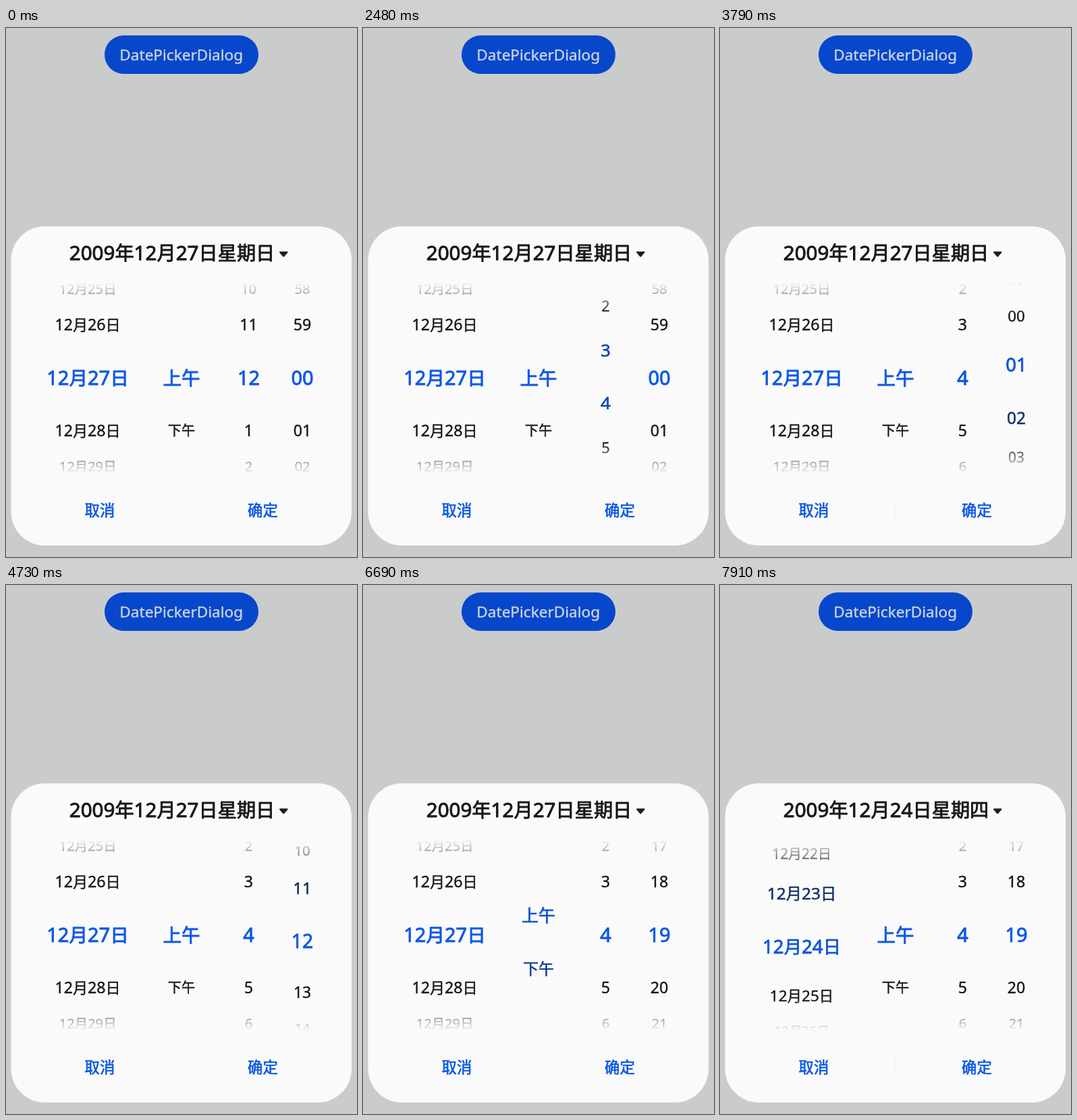
An HTML page with a canvas that plays this animation: 520x784 px, repeating every 7.99 s.

```html
<!DOCTYPE html>
<html lang="zh">
<head>
<meta charset="utf-8">
<style>
  html, body { margin: 0; width: 100%; height: 100%; overflow: hidden; background: #cacccb; }
  canvas { display: block; width: 520px; height: 784px; }
</style>
</head>
<body>
<canvas id="stage" width="520" height="784"></canvas>
<script>
const ctx = document.getElementById('stage').getContext('2d');
const LOOP = 7990;
const TICK = 78; // the wheels redraw in steps of this many ms
const MIDDLE = 518.3;
const BLUE = [14, 88, 228], INK = [21, 23, 27];
const PANEL = '250,250,250';

const lerp = (a, b, k) => a + (b - a) * k;
const drag = p => p * p * (3 - 2 * p);
const fling = p => 1 - (1 - p) ** 2;
const swipe = (start, ticks, to, ease) => ({ start, ticks, to, ease });

const dates = {
  x: 121, first: 27, pad: 152, side: 22.1,
  label: i => `12月${i}日`,
  swipes: [swipe(7440, 1, 26, fling), swipe(7518, 9, 23, drag)]
};
const halves = {
  x: 260, first: 0, pad: 74, side: 20.2,
  label: i => ['上午', '下午'][i] || '',
  swipes: [swipe(5370, 9, 1, fling), swipe(6450, 10, 0, fling)]
};
const hours = {
  x: 359.5, first: 0, pad: 74, side: 22.1,
  label: i => String((i + 12) % 12 || 12),
  swipes: [swipe(910, 9, 1, drag), swipe(1610, 20, 4, fling)]
};
const minutes = {
  x: 439, first: 0, pad: 74, side: 22.1,
  label: i => String((i + 60) % 60).padStart(2, '0'),
  swipes: [swipe(3170, 6, 1, drag), swipe(3790, 9, 8, drag), swipe(4640, 5, 19, drag)]
};
const wheels = [dates, halves, hours, minutes];

// Wheel position at time t, and whether a finger is about to lift
function wheelState({ first, swipes }, t) {
  let pos = first, pressed = false;
  for (const s of swipes) {
    if (t < s.start) break;
    const n = Math.floor((t - s.start) / TICK) + 1;
    pos = lerp(pos, s.to, s.ease(Math.min(1, n / s.ticks)));
    pressed = n > 1 && n === s.ticks;
  }
  return { pos, pressed };
}

// Centred text; digits and letters use a slightly larger Latin face
function write(str, x, y, size, color, bold) {
  const runs = str.match(/[\u4e00-\u9fff]+|[^\u4e00-\u9fff]+/g) || [];
  const setFont = run => {
    ctx.font = /[\u4e00-\u9fff]/.test(run)
      ? `${size}px "Noto Sans CJK SC", "Noto Sans CJK", sans-serif`
      : `${size * 1.05}px "Noto Sans", sans-serif`;
  };
  const widths = runs.map(run => {
    setFont(run);
    return ctx.measureText(run).width;
  });
  let left = x - widths.reduce((a, b) => a + b, 0) / 2;
  ctx.fillStyle = ctx.strokeStyle = color;
  ctx.lineWidth = bold;
  ctx.lineJoin = 'round';
  runs.forEach((run, i) => {
    setFont(run);
    ctx.fillText(run, left, y + size * 0.37);
    ctx.strokeText(run, left, y + size * 0.37);
    left += widths[i];
  });
}

function box(x, y, w, h, r, color) {
  ctx.fillStyle = color;
  ctx.beginPath();
  ctx.roundRect(x, y, w, h, r);
  ctx.fill();
}

function fade(y0, y1) {
  const g = ctx.createLinearGradient(0, y0, 0, y1);
  g.addColorStop(0, `rgba(${PANEL},1)`);
  g.addColorStop(1, `rgba(${PANEL},0)`);
  ctx.fillStyle = g;
  ctx.fillRect(30, Math.min(y0, y1), 460, Math.abs(y1 - y0));
}

function drawWheel(wheel, t) {
  const { x, pad, side, label } = wheel;
  const { pos, pressed } = wheelState(wheel, t);
  if (pressed) box(x - pad / 2, 481.5, pad, 76, 11, '#f5f5f5');
  for (let i = Math.ceil(pos - 2.9); i <= pos + 2.9; i++) {
    const d = i - pos;
    const near = Math.min(1, Math.abs(d));
    const far = Math.abs(d) - near;
    const y = MIDDLE + Math.sign(d) * (near * 78.5 + far * 53);
    const size = lerp(27.6, side, near) - far * 2.8;
    const color = BLUE.map((c, n) => Math.round(lerp(c, INK[n], near * near)));
    write(label(i), x, y, size, `rgb(${color})`, lerp(0.9, 0.4, near) - far * 0.15);
  }
}

function drawTitle(t) {
  const day = Math.round(wheelState(dates, t - TICK).pos);
  const weekday = '日一二三四五六'[(day + 1) % 7];
  write(`2009年12月${day}日星期${weekday}`, 246, 333.8, 28.2, '#17181a', 0.9);
  ctx.fillStyle = ctx.strokeStyle = '#1d1e20';
  ctx.lineWidth = 2;
  ctx.beginPath();
  ctx.moveTo(406, 332.3);
  ctx.lineTo(416.5, 332.3);
  ctx.lineTo(411.2, 338.3);
  ctx.closePath();
  ctx.fill();
  ctx.stroke();
}

function draw(t) {
  ctx.fillStyle = '#cacccb';
  ctx.fillRect(0, 0, 520, 784);
  box(146, 11, 228, 57, 28.5, '#0647cb');
  write('DatePickerDialog', 259.7, 39.6, 21.5, '#cbd2e0', 0.4);
  box(7.5, 294, 504.5, 473, 50, `rgb(${PANEL})`);
  drawTitle(t);

  ctx.save();
  ctx.beginPath();
  ctx.rect(30, 377, 460, 284);
  ctx.clip();
  wheels.forEach(w => drawWheel(w, t));
  fade(377, 425);
  fade(661, 613);
  ctx.restore();

  const blue = `rgb(${BLUE})`;
  write('取消', 139, 714.5, 22.4, blue, 0.7);
  write('确定', 380.5, 714.5, 22.4, blue, 0.7);
  ctx.fillStyle = '#f1f1f1';
  ctx.fillRect(259.5, 698, 1, 33);
}

function frame() {
  draw(performance.now() % LOOP);
  requestAnimationFrame(frame);
}
frame();
</script>
</body>
</html>
```
